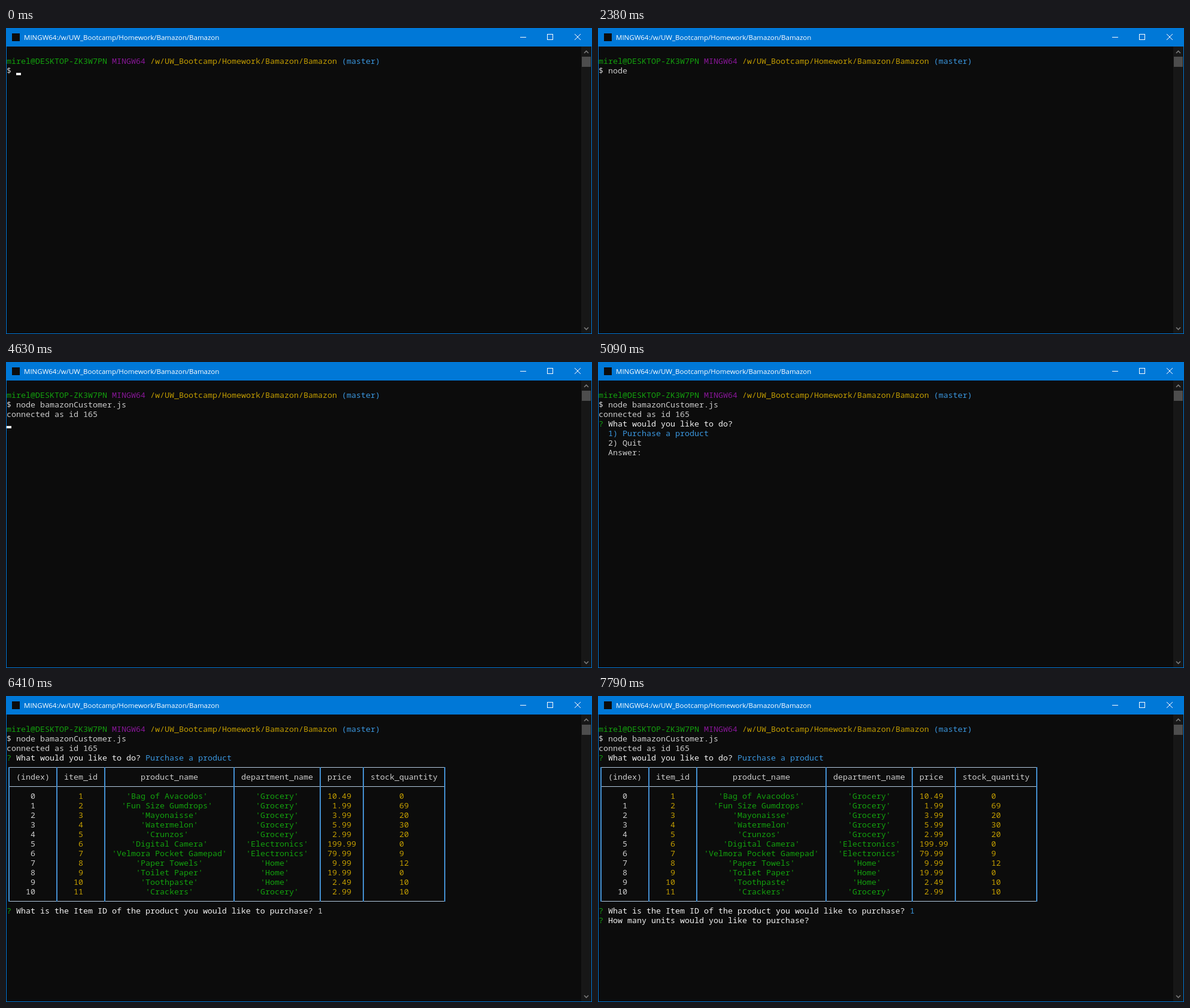
These frames come from a looping animation (979 px wide and 512 px high, 8 s). An HTML page with a canvas:

```html
<!DOCTYPE html>
<html lang="en">
<head>
<meta charset="utf-8">
<title>Terminal</title>
<style>
  html, body { margin: 0; width: 100%; height: 100%; overflow: hidden; background: #0c0c0c; }
  canvas { display: block; }
</style>
</head>
<body>
<canvas id="stage" width="979" height="512"></canvas>
<script>
const ctx = document.getElementById('stage').getContext('2d');
const LOOP = 8000, CELL = 8, LINE = 16, LEFT = 1, TOP = 31;
const MONO = '13.333px "Noto Sans Mono", "DejaVu Sans Mono", monospace';
const UI = '11.5px "Open Sans", "Noto Sans", sans-serif';
const GREY = '#cccccc', WHITE = '#f2f2f2', GREEN = '#13a10e', PURPLE = '#881798',
      GOLD = '#c19c00', CYAN = '#3a96dd', BLUE = '#0078d7';
const PATH = '/w/UW_Bootcamp/Homework/Bamazon/Bamazon';

// Command line: [time, typed text, cursor visible]
const typing = [
  [0, '', 1], [130, '', 0],
  [590, 'b', 1], [720, 'ba', 1], [850, 'bam', 1], [990, 'bama', 1], [1050, 'bama', 0],
  [1310, 'bam', 1], [1440, 'ba', 1], [1510, 'b', 1], [1580, '', 1], [1650, '', 0],
  [1850, 'n', 1], [1920, 'no', 1], [2050, 'node', 1], [2120, 'node ', 1], [2380, 'node ', 0],
  [2710, 'node b', 1], [2780, 'node bam', 1], [2910, 'node bamaz', 1], [2980, 'node bamazon', 1],
  [3310, 'node bamazon', 0], [3510, 'node bamazonC', 1],
  [3710, 'node bamazonCustomer.js ', 1], [3780, 'node bamazonCustomer.js ', 0]
];

// Cursor after the command has run: [time, column, row], column -1 hides it
const cursors = [
  [4040, 0, 3], [4170, -1, 0], [4630, 0, 4], [4760, 10, 7], [5090, -1, 0],
  [5550, 65, 20], [6010, -1, 0], [6340, 66, 20], [6410, -1, 0],
  [6670, 0, 20], [6740, 45, 21], [6870, -1, 0], [7330, 45, 21], [7790, -1, 0]
];

const edges = [0, 10, 20, 47, 65, 74, 91];
const header = ['(index)', 'item_id', 'product_name', 'department_name', 'price', 'stock_quantity'];
const items = [
  ['Bag of Avacodos', 'Grocery', 10.49, 0],
  ['Fun Size Gumdrops', 'Grocery', 1.99, 69],
  ['Mayonaisse', 'Grocery', 3.99, 20],
  ['Watermelon', 'Grocery', 5.99, 30],
  ['Crunzos', 'Grocery', 2.99, 20],
  ['Digital Camera', 'Electronics', 199.99, 0],
  ['Velmora Pocket Gamepad', 'Electronics', 79.99, 9],
  ['Paper Towels', 'Home', 9.99, 12],
  ['Toilet Paper', 'Home', 19.99, 0],
  ['Toothpaste', 'Home', 2.49, 10],
  ['Crackers', 'Grocery', 2.99, 10]
];

const latest = (list, t) => list.filter(e => e[0] <= t).pop();

function box(x, y, w, h, color) {
  ctx.fillStyle = color;
  ctx.fillRect(x, y, w, h);
}

function put(col, row, text, color) {
  ctx.fillStyle = color;
  ctx.fillText(text, LEFT + col * CELL, TOP + row * LINE + 13);
}

function cursor(col, row) {
  box(LEFT + col * CELL, TOP + row * LINE + 12, CELL, 4, WHITE);
}

function stroke(color, width, ...lines) {
  ctx.strokeStyle = color;
  ctx.lineWidth = width;
  ctx.beginPath();
  for (const line of lines) {
    line.forEach(([x, y], i) => i ? ctx.lineTo(x, y) : ctx.moveTo(x, y));
  }
  ctx.stroke();
}

function drawWindow() {
  box(0, 0, 979, 512, BLUE);
  box(1, 31, 977, 480, '#0c0c0c');
  box(10, 9, 13, 13, '#0c0c0c');
  ctx.font = UI;
  ctx.fillStyle = '#ffffff';
  ctx.fillText('MINGW64:' + PATH, 30, 20);

  box(859, 15, 10, 1, '#ffffff');
  ctx.strokeStyle = '#ffffff';
  ctx.lineWidth = 1;
  ctx.strokeRect(904.5, 10.5, 9, 9);
  stroke('#ffffff', 1, [[950, 10], [960, 20]], [[960, 10], [950, 20]]);

  box(961, 31, 17, 480, '#171717');
  box(962, 48, 15, 17, '#4d4d4d');
  stroke('#7a7a7a', 1.6,
    [[966, 42], [969.5, 38.5], [973, 42]],
    [[966, 501], [969.5, 504.5], [973, 501]]);
}

function drawRow(row, cells, colors) {
  cells.forEach((cell, i) => {
    const text = String(cell), inner = edges[i + 1] - edges[i] - 1;
    put(edges[i] + 1 + Math.floor((inner - text.length) / 2), row, text, colors[i]);
  });
}

function drawTable() {
  const mid = n => LEFT + n * CELL + 4;
  const top = TOP + 5 * LINE + 8, bottom = TOP + 19 * LINE + 8;
  for (const y of [top, top + 32, bottom]) box(mid(0), y, mid(91) - mid(0), 1, '#b4cbe0');
  for (const e of edges) box(mid(e) - 1, top, 2, bottom - top + 1, '#438fd0');
  drawRow(6, header, Array(6).fill(GREY));
  items.forEach(([name, dept, price, stock], i) => {
    drawRow(8 + i, [i, i + 1, `'${name}'`, `'${dept}'`, price.toFixed(2), stock],
      [GREY, GOLD, GREEN, GREEN, GOLD, GOLD]);
  });
}

function ask(row, question) {
  put(0, row, '?', GREEN);
  put(2, row, question, WHITE);
}

function drawMenu(t) {
  ask(4, 'What would you like to do?');
  if (t < 5550) {
    put(2, 5, '1) Purchase a product', CYAN);
    put(2, 6, '2) Quit', GREY);
    put(2, 7, 'Answer:', GREY);
  } else {
    put(29, 4, 'Purchase a product', CYAN);
  }
}

function drawPurchase(t) {
  drawTable();
  if (t < 6670 || t >= 6740) {
    ask(20, 'What is the Item ID of the product you would like to purchase?');
    if (t >= 6340) put(65, 20, '1', t < 6670 ? GREY : CYAN);
  }
  if (t >= 6740) ask(21, 'How many units would you like to purchase?');
}

function draw(t) {
  drawWindow();
  ctx.font = MONO;
  put(0, 1, 'mirel@DESKTOP-ZK3W7PN', GREEN);
  put(22, 1, 'MINGW64', PURPLE);
  put(30, 1, PATH, GOLD);
  put(70, 1, '(master)', CYAN);

  const [, typed, shown] = latest(typing, t);
  put(0, 2, '$ ' + typed, GREY);
  if (shown) cursor(2 + typed.length, 2);

  if (t >= 4630) put(0, 3, 'connected as id 165', GREY);
  if (t >= 4760) drawMenu(t);
  if (t >= 5550) drawPurchase(t);

  const spot = latest(cursors, t);
  if (spot && spot[1] >= 0) cursor(spot[1], spot[2]);
}

const start = performance.now();
function tick() {
  draw((performance.now() - start) % LOOP);
  requestAnimationFrame(tick);
}
tick();
</script>
</body>
</html>
```
